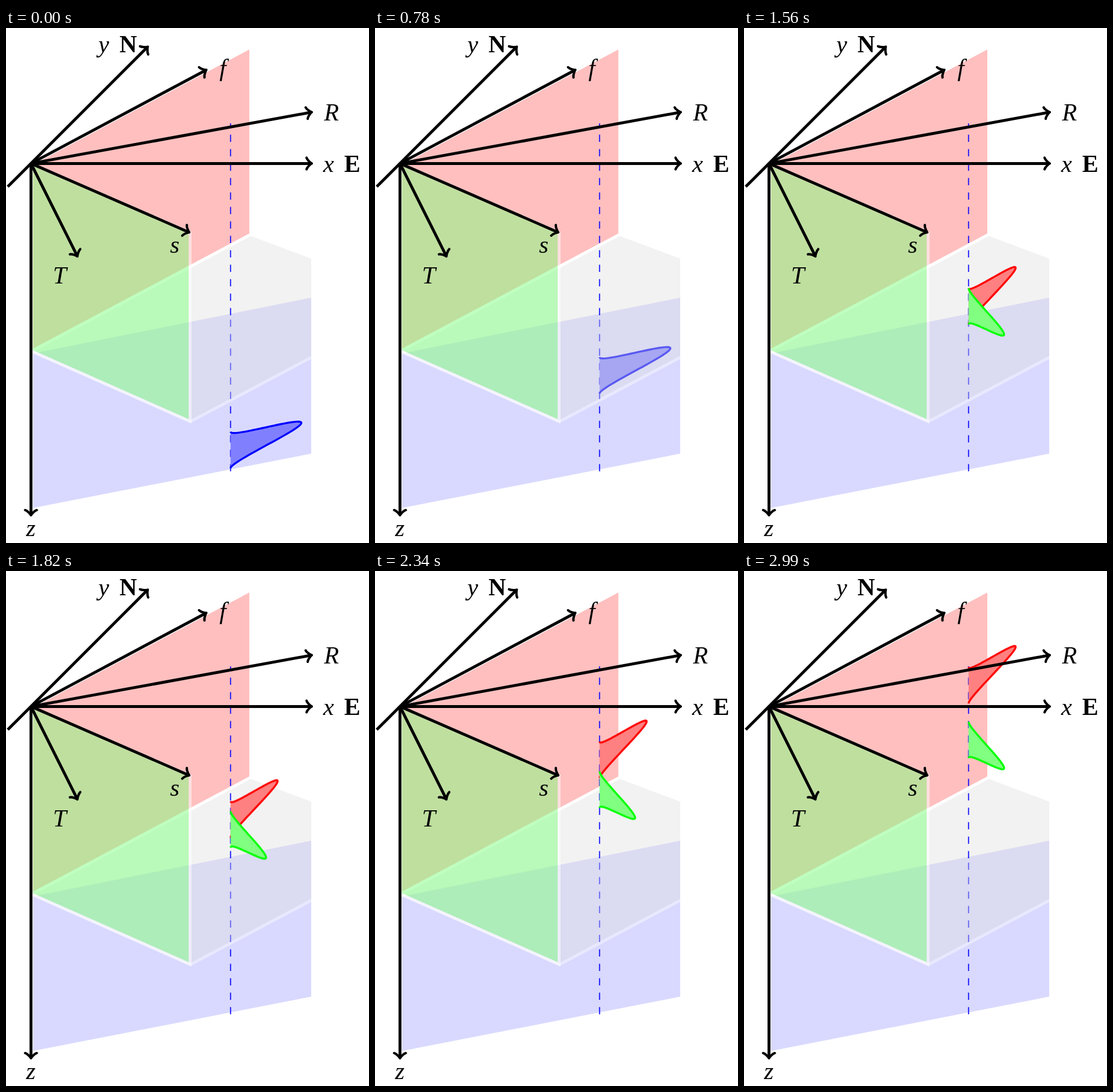
Recreate the animation shown at these times as an HTML page. Size 628x891 px, loop 3.12 s.

```html
<!DOCTYPE html>
<html lang="en">
<head>
<meta charset="utf-8">
<title>Shear wave splitting</title>
<style>
  html, body { margin: 0; width: 100%; height: 100%; overflow: hidden; background: #fff; }
  svg { display: block; width: 628px; height: 891px; }
  text { font: italic 42px "Liberation Serif", "Noto Serif", serif; text-anchor: middle; }
  .bold { font-style: normal; font-weight: bold; }
  .plane { stroke: #fff; stroke-width: 5; }
  .dash { stroke: #00f; stroke-width: 1.7; stroke-dasharray: 12.5 12.5; }
  .pulse { stroke-width: 3.4; stroke-linejoin: round; }
  #axes path { fill: none; stroke: #000; stroke-width: 5; }
  #axes .head { stroke-width: 4.2; stroke-linecap: round; stroke-linejoin: round; }

  #blue { --rise: -258px; animation: first 3120ms infinite; }
  #red { --rise: -309.6px; }
  #green { --rise: -206.4px; }
  #red, #green { animation: second 3120ms infinite; }
  @keyframes first {
    0% { transform: none; opacity: 1; animation-timing-function: steps(12); }
    49.999% { transform: translateY(var(--rise)); opacity: 1; }
    50%, 100% { transform: translateY(var(--rise)); opacity: 0; }
  }
  @keyframes second {
    0%, 49.999% { transform: none; opacity: 0; }
    50% { transform: none; opacity: 1; animation-timing-function: steps(12); }
    100% { transform: translateY(var(--rise)); opacity: 1; }
  }
</style>
</head>
<body>
<svg viewBox="0 0 628 891">
  <!-- lower half-space -->
  <path class="plane" fill="#d9d9ff" d="M44 561L530.5 463.500V738.500L44 833.500Z"/>
  <path class="dash" d="M388.500 767V493"/>
  <path id="blue" class="pulse" fill="#8080ff" stroke="#00f"/>

  <!-- translucent upper layer -->
  <g opacity=".4">
    <path fill="#dfdfdf" d="M44 559L424 357.500V360L528 399V570.500L319 681Z"/>
    <path fill="none" stroke="#fff" stroke-width="5" d="M44 559L319 681L528 570"/>
  </g>
  <path class="plane" fill="#ffbfbf" d="M44 235L423.500 33V357L44 559Z"/>
  <path class="dash" d="M388.500 497V165"/>
  <path id="red" class="pulse" fill="#ff8080" stroke="#f00"/>
  <path id="green" class="pulse" fill="#80ff80" stroke="#0f0"/>
  <path class="plane" fill="#80ff80" opacity=".5" d="M44 235L318.500 354V680.500L44 559Z"/>

  <g id="axes"></g>
  <text x="169" y="42">y</text>
  <text x="211.500" y="41.500" class="bold">N</text>
  <text x="375" y="83">f</text>
  <text x="563" y="160">R</text>
  <text x="558" y="249">x</text>
  <text x="599" y="248.500" class="bold">E</text>
  <text x="292" y="389">s</text>
  <text x="93" y="442">T</text>
  <text x="43" y="879">z</text>
</svg>
<script>
  const axes = document.getElementById('axes');

  function addPath(d, attrs = {}) {
    const p = document.createElementNS('http://www.w3.org/2000/svg', 'path');
    p.setAttribute('d', d);
    for (const key in attrs) p.setAttribute(key, attrs[key]);
    axes.append(p);
  }

  function arrow(x2, y2, x1 = 43.2, y1 = 234.4) {
    const a = Math.atan2(y2 - y1, x2 - x1);
    const bx = x2 - 2 * Math.cos(a), by = y2 - 2 * Math.sin(a);
    addPath(`M${x1} ${y1}L${bx} ${by}`);
    addPath('M-10 -10C-9 -6 -2.500 -.6 -1 0C-2.500 .6 -9 6 -10 10', {
      class: 'head',
      transform: `translate(${x2} ${y2}) rotate(${a * 180 / Math.PI})`
    });
  }

  // Squared-sine pulse along the ray, sheared towards its polarisation.
  function pulse(id, top, amp, shear) {
    const pts = [];
    for (let i = 0; i <= 60; i++) {
      const u = i / 60, s = amp * Math.sin(Math.PI * u) ** 2;
      pts.push(`${(388.5 + s).toFixed(2)} ${(top + 63 * u + shear * s).toFixed(2)}`);
    }
    document.getElementById(id).setAttribute('d', 'M' + pts.join('L'));
  }

  arrow(43.2, 844);
  arrow(530, 234.4);
  arrow(246, 31.6, 3, 274.6);
  arrow(347.5, 72);
  arrow(530, 145.4);
  arrow(318, 354);
  arrow(124, 396);

  pulse('blue', 698.5, 122.5, -0.382);
  pulse('red', 450, 81.5, -0.815);
  pulse('green', 450, 61.5, 0.79);
</script>
</body>
</html>
```
